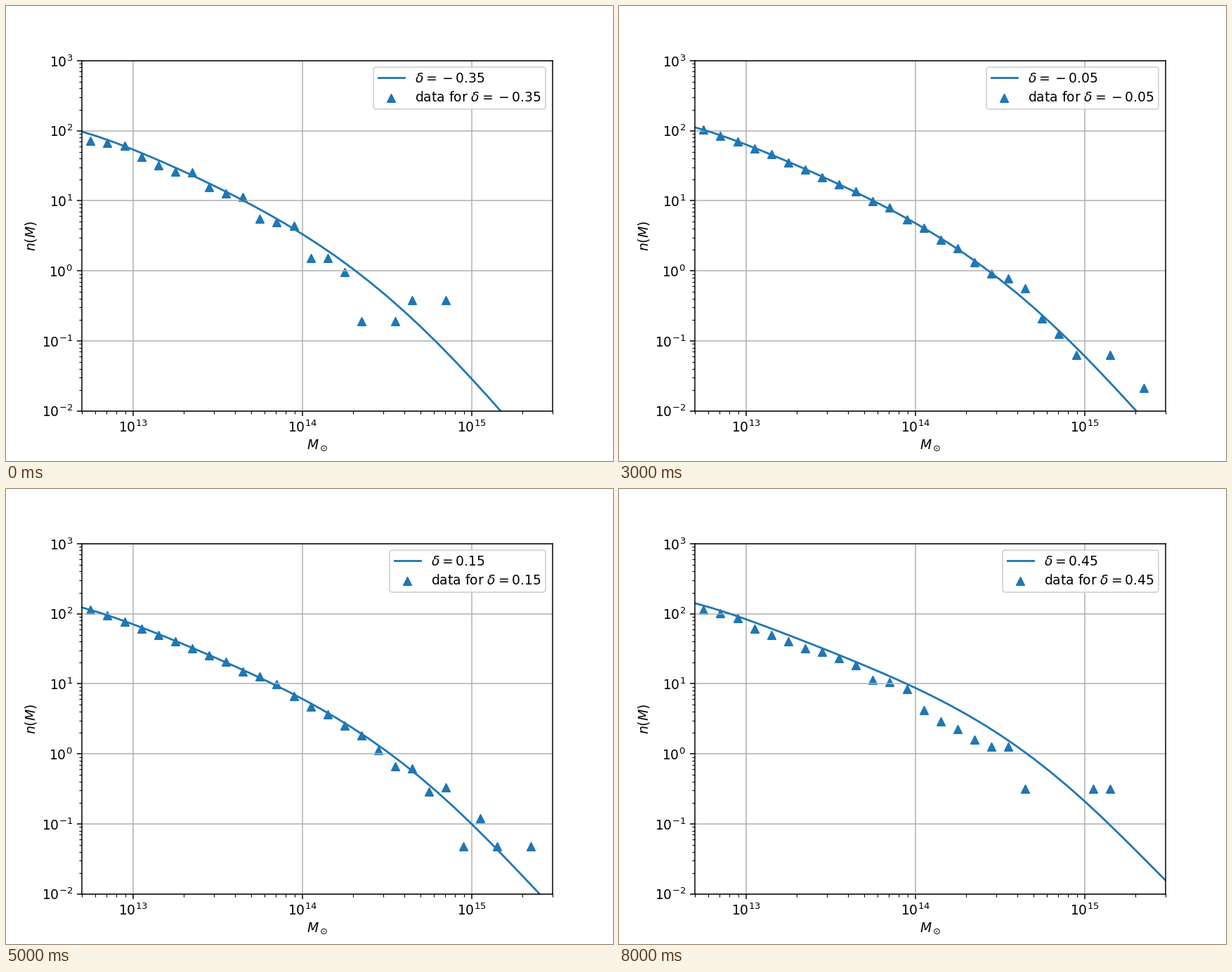
A matplotlib script that plays this animation: 864x648 px, repeating every 9000 ms.

```python
import numpy as np
import matplotlib.pyplot as plt
from matplotlib.animation import FuncAnimation
from numpy.polynomial import Polynomial

DELTAS = np.linspace(-0.35, 0.45, 9)  # density contrasts
MID = 0.05
BIN = 0.1  # width of a mass bin in dex

# key points of the mass function at the middle contrast, in log10
BASE = Polynomial.fit(
    [12.7, 13, 13.35, 13.75, 14.15, 14.55, 14.95, 15.477],
    [2.065, 1.835, 1.47, 1.048, 0.534, -0.149, -0.983, -2.32], 5)


def model(log_m, delta):
    """Halo density; massive halos react most to the contrast."""
    tilt = 0.15 + 1.4 / (1 + np.exp(-1.7 * (log_m - 14.6)))
    return 10 ** (BASE(log_m) + (delta - MID) * tilt)


def sample(delta):
    """Masses and densities of the bins that hold at least one halo."""
    rng = np.random.default_rng(round(100 * (delta + 1)))
    log_m = 12.75 + BIN * np.arange(27)
    # extreme contrasts are rare, so one halo weighs more there
    unit = 0.019 * np.exp(16 * (delta - 0.03) ** 2)
    expected = (1 - 0.7 * delta ** 2) * model(log_m, delta) / unit
    n = rng.poisson(expected)
    keep = n > 0
    return np.column_stack([10 ** log_m[keep], n[keep] * unit])


fig, ax = plt.subplots(figsize=(6.4, 4.8), dpi=135)
ax.set_xscale("log")
ax.set_yscale("log")
ax.set_xlim(5e12, 3e15)
ax.set_ylim(1e-2, 1e3)
ax.set_xlabel(r"$M_\odot$", labelpad=2.4)
ax.set_ylabel("$n(M)$", labelpad=2.4)
ax.grid()

grid_m = np.arange(12.6, 15.55, BIN)
curve, = ax.plot([], [])
points = ax.scatter([], [], marker="^", color="C0")


def update(i):
    delta = DELTAS[i]
    # the empty group keeps the minus spaced like a binary operator
    value = f"{delta:.2f}".replace("-", "{}-")
    label = rf"$\delta = {value}$"
    curve.set_data(10 ** grid_m, model(grid_m, delta))
    curve.set_label(label)
    points.set_offsets(sample(delta))
    points.set_label("data for " + label)
    legend = ax.legend(loc="upper right", borderpad=0.35, labelspacing=0.45)
    return curve, points, legend


anim = FuncAnimation(fig, update, frames=len(DELTAS), interval=1000,
                     repeat=True, repeat_delay=0, blit=False)
plt.show()
```
